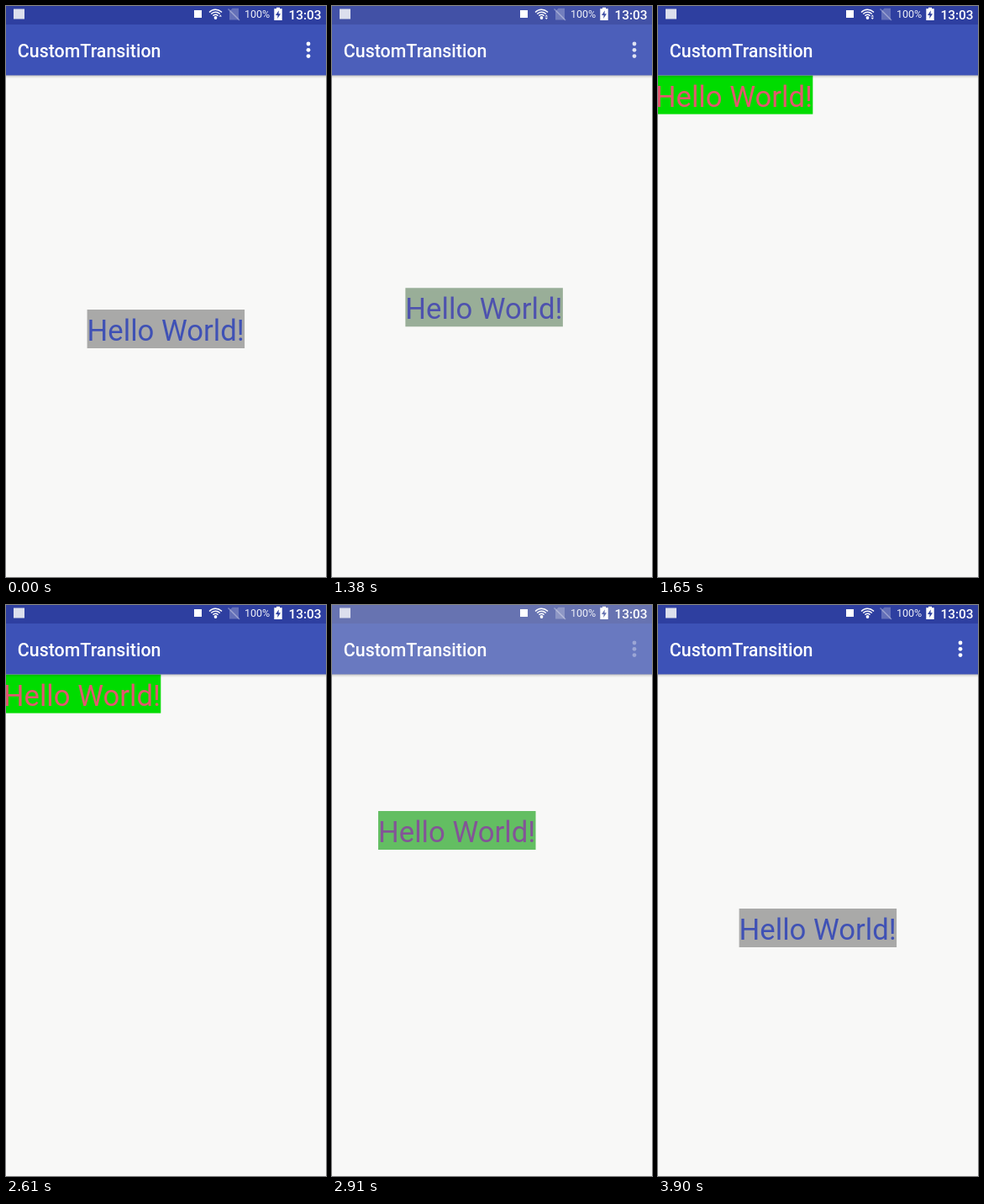
Animation, 381 px wide and 679 px high, one loop 4.2 s. Source, as an HTML page with a canvas:

```html
<!DOCTYPE html>
<html lang="en">
<head>
<meta charset="utf-8">
<title>CustomTransition</title>
<style>
html, body { margin: 0; width: 100%; height: 100%; overflow: hidden; background: #f8f8f7; }
canvas { display: block; width: 381px; height: 679px; }
</style>
</head>
<body>
<canvas id="stage"></canvas>
<script>
const W = 381, H = 679, LOOP = 4200, STEP = 30, MOVE = 300;
const VEIL = [240, 242, 218];
const STATUS = [46, 63, 160], BAR = [61, 82, 183];
const GREY = [169, 169, 168], GREEN = [0, 220, 0];
const BLUE = [63, 81, 181], PINK = [226, 88, 110];

const canvas = document.getElementById('stage');
const ctx = canvas.getContext('2d');
const dpr = window.devicePixelRatio || 1;
canvas.width = W * dpr;
canvas.height = H * dpr;
ctx.scale(dpr, dpr);

const lerp = (a, b, k) => a + (b - a) * k;
const mix = (a, b, k) => `rgb(${a.map((v, i) => Math.round(lerp(v, b[i], k))).join(',')})`;
const clamp = v => Math.min(1, Math.max(0, v));
const ease = v => (1 - Math.cos(Math.PI * clamp(v))) / 2;

function box(x, y, w, h, color) {
  ctx.fillStyle = color;
  ctx.fillRect(x, y, w, h);
}

function dot(x, y, r, color) {
  ctx.fillStyle = color;
  ctx.beginPath();
  ctx.arc(x, y, r, 0, 2 * Math.PI);
  ctx.fill();
}

function poly(points, color) {
  ctx.fillStyle = color;
  ctx.beginPath();
  points.forEach(([x, y]) => ctx.lineTo(x, y));
  ctx.fill();
}

function text(str, x, y, size, weight, color) {
  ctx.font = `${weight} ${size}px Roboto, sans-serif`;
  ctx.fillStyle = color;
  ctx.fillText(str, x, y);
}

// 0 = label centred, 1 = label in the corner
function progress(t) {
  if (t < 1350) return 0;
  if (t < 2790) return ease((t - 1321) / MOVE);
  return 1 - ease((t - 2744) / MOVE);
}

function wifi(t) {
  ctx.strokeStyle = '#fff';
  ctx.lineWidth = 1.5;
  for (const r of [4.2, 7.2, 10.2]) {
    ctx.beginPath();
    ctx.arc(249.5, 14.5, r, -Math.PI * 0.76, -Math.PI * 0.24);
    ctx.stroke();
  }
  dot(249.5, 14, 1.9, '#fff');
  if (t < 2070) {
    poly([[253.5, 12.6], [257, 12.6], [255.25, 10.4]], '#fff');
    if (t >= 1170) poly([[253.5, 13.8], [257, 13.8], [255.25, 16]], '#fff');
  }
}

function noSim() {
  poly([[269.5, 2.8], [277, 2.8], [277, 16.5], [266, 16.5], [266, 6.3]], 'rgba(255,255,255,0.26)');
  ctx.strokeStyle = 'rgba(255,255,255,0.36)';
  ctx.lineWidth = 1.4;
  ctx.beginPath();
  ctx.moveTo(264.5, 3.5);
  ctx.lineTo(278, 17);
  ctx.stroke();
}

function battery(hole) {
  box(322, 1.8, 4, 2, '#fff');
  box(319.3, 3.2, 9.4, 13.8, '#fff');
  poly([[324.8, 5.2], [321, 11], [323.5, 11], [323.2, 15], [327, 9.2], [324.5, 9.2]], hole);
}

function statusBar(t, fade) {
  const back = mix(STATUS, VEIL, fade * 1.2);
  box(0, 0, W, 22, back);
  box(9, 3.5, 13, 12, '#dcdfed');
  box(224, 5, 9, 9, '#fff');
  wifi(t);
  noSim();
  text('100%', 284, 14.2, 12.5, 400, '#eef0f8');
  battery(back);
  text('13:03', 336.5, 15.5, 15.4, 500, '#fff');
}

function appBar(p, fade) {
  const shade = ctx.createLinearGradient(0, 82, 0, 86.5);
  shade.addColorStop(0, 'rgba(0,0,0,0.27)');
  shade.addColorStop(0.5, 'rgba(0,0,0,0.08)');
  shade.addColorStop(1, 'rgba(0,0,0,0)');
  box(0, 82, W, 5, shade);
  box(0, 22, W, 60.4, mix(BAR, VEIL, fade));
  text('CustomTransition', 13.8, 61, 21.4, 500, '#fff');
  for (const y of [45, 52.3, 59.6]) dot(360, y, 2.4, `rgba(255,255,255,${(1 - p) ** 2})`);
}

function label(p) {
  const x = lerp(96.6, -3.2, p), y = lerp(361, 82.6, p);
  box(x, y, 187.5, 46, mix(GREY, GREEN, p));
  text('Hello World!', x, y + 36.9, 34.7, 400, mix(BLUE, PINK, p));
}

function draw(now) {
  const t = Math.floor((now % LOOP) / STEP) * STEP;
  const p = progress(t);
  const fade = p * (1 - p);
  box(0, 0, W, H, '#f8f8f7');
  label(p);
  appBar(p, fade);
  statusBar(t, fade);
}

const start = performance.now();
function tick() {
  draw(performance.now() - start);
  requestAnimationFrame(tick);
}
tick();
</script>
</body>
</html>
```
